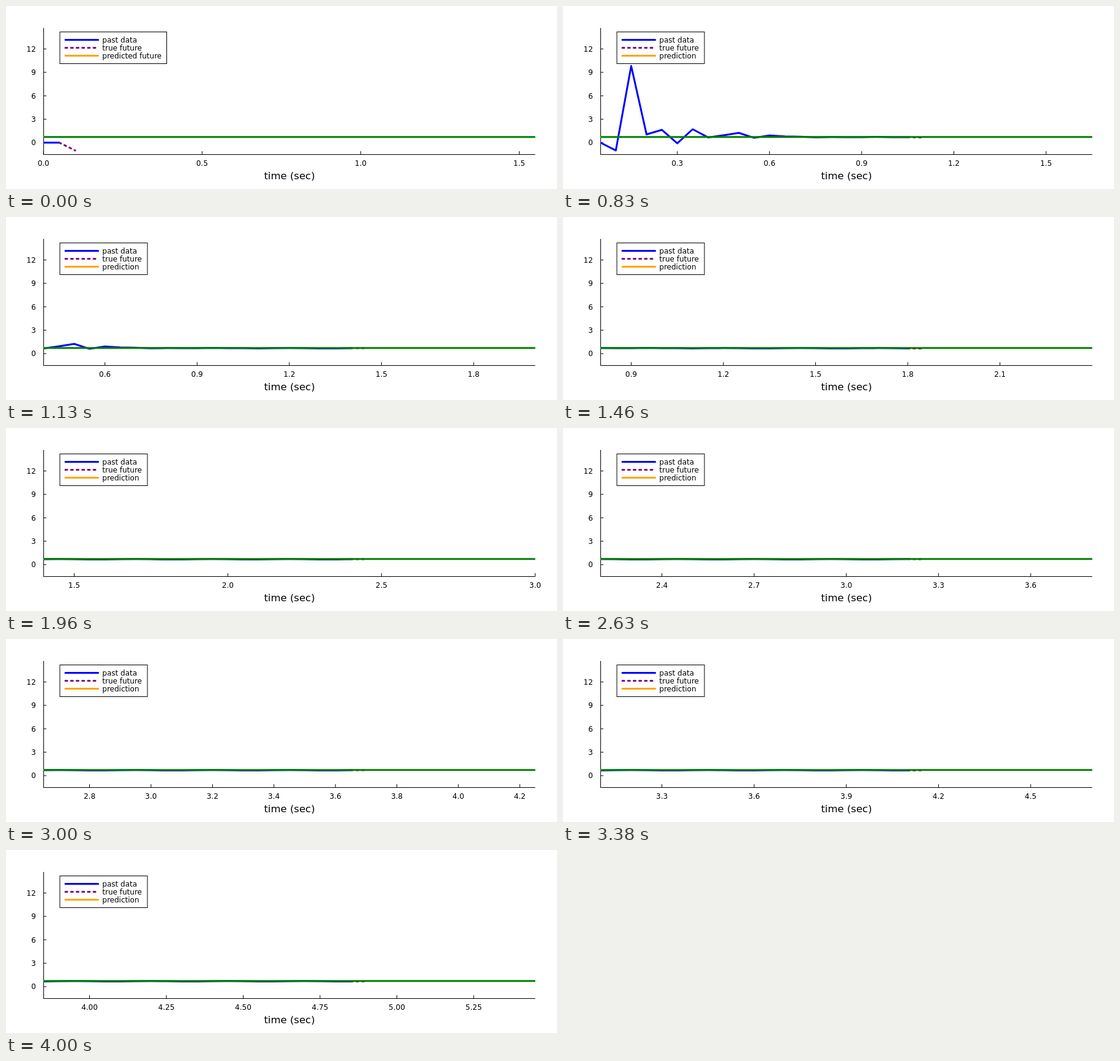
Write an HTML page that moves like this. It is 900 px wide and 300 px high and loops after 4040 ms.

```html
<!DOCTYPE html>
<html lang="en">
<head>
<meta charset="utf-8">
<title>Prediction plot</title>
<style>
  html, body { margin: 0; width: 100%; height: 100%; overflow: hidden; background: #fff; }
  svg { display: block; font: 12px "DejaVu Sans", sans-serif; }
  .axis { stroke: #000; fill: none; }
  .line { fill: none; stroke-width: 3; stroke-linecap: round; stroke-linejoin: round; }
  .dash { stroke-dasharray: 3 6.2; }
</style>
</head>
<body>
<svg width="900" height="300" viewBox="0 0 900 300">
  <clipPath id="area"><rect x="61" y="36" width="803.5" height="207.5"/></clipPath>
  <g id="plot"></g>
</svg>
<script>
const LOOP = 4040, DT = 0.05, SETPOINT = 0.72;
const LEFT = 61.2, RIGHT = 864.3, BOTTOM = 243.3;
const START = [0, 0, -1, 9.82, 1.05, 1.64, -0.08, 1.72, 0.67, 0.94, 1.25, 0.62,
  0.91, 0.8, 0.77, 0.69, 0.72, 0.71, 0.71, 0.75, 0.71, 0.71];
const STEPS = [[5, 0.9], [2, 0.7], [2.5, 0.5], [3, 0.2]];
const plot = document.getElementById("plot");

// settling transient, then a small ripple just below the setpoint
const value = j => j < START.length ? START[j]
  : 0.685 + 0.03 * Math.cos(2 * Math.PI * (j * DT - 3.95) / 0.25);
const yOf = v => 224 - 12.8 * v;

// tick step with the best mix of count, coverage and niceness
function ticks(min, max) {
  let best = { score: -1 };
  for (const [q, nice] of STEPS) {
    const step = q * 0.1, at = [];
    for (let r = 0; r * step <= max; r++) if (r * step >= min) at.push(r * step);
    const n = at.length;
    if (n < 4) continue;
    const score = Math.max(0, 1 - Math.abs(n - 5) / 5) / 4
      + 0.5 * (max - min) / ((n - 1) * step) + nice / 4 + (at[0] === 0) / 6;
    if (score > best.score) best = { score, at, digits: q === 2.5 ? 2 : 1 };
  }
  return best;
}

const text = (x, y, s, anchor = "start", size = 12) =>
  `<text x="${x}" y="${y}" text-anchor="${anchor}" font-size="${size}">${s}</text>`;
const line = (points, color, cls = "") =>
  `<polyline class="line ${cls}" stroke="${color}" points="${points}"/>`;

function axes(xOf, { at, digits }) {
  let marks = `M61.5 36V243.5M61 243.5H864.5`, labels = "";
  for (const t of at) {
    marks += `M${xOf(t)} ${BOTTOM}v-5.3`;
    labels += text(xOf(t), 261.5, t.toFixed(digits), "middle");
  }
  for (let v = 0; v <= 12; v += 3) {
    marks += `M61 ${yOf(v)}h5`;
    labels += text(48.8, yOf(v) + 4.4, v, "end");
  }
  return `<path class="axis" d="${marks}"/>` + labels + text(463, 284, "time (sec)", "middle", 16.5);
}

function legend(name, width) {
  const rows = [["past data", "blue"], ["true future", "purple", "dash"], [name, "orange"]];
  return `<rect x="88" y="42.5" width="${width}" height="52" fill="#fff" stroke="#000"/>` +
    rows.map(([label, color, cls], i) => {
      const y = 55.5 + 13 * i;
      return line(`97,${y} 150.5,${y}`, color, cls) + text(157.3, y + 4.5, label);
    }).join("");
}

function draw(k) {
  const warmup = k < 20, now = (k + 1) * DT;
  const min = warmup ? 0 : now - 1, max = warmup ? 1.55 : now + 0.6;
  const xOf = t => LEFT + (t - min) / (max - min) * (RIGHT - LEFT);
  const curve = (from, to) => {
    const points = [];
    for (let j = from; j <= to; j++) points.push(xOf(j * DT) + "," + yOf(value(j)));
    return points.join(" ");
  };
  const level = yOf(SETPOINT);
  plot.innerHTML = axes(xOf, ticks(min, max)) +
    `<g clip-path="url(#area)">` +
    line(curve(Math.max(0, k - 19), k + 1), "blue") +
    line(curve(k + 1, k + 2), "purple", "dash") +
    line(`${LEFT},${level} ${RIGHT},${level}`, "green") + `</g>` +
    (warmup ? legend("predicted future", 174.5) : legend("prediction", 143));
}

let shown = -1;
function tick() {
  // 24 steps per second, rounded to hundredths of a second
  const t = Math.floor(performance.now() % LOOP / 10) * 10;
  const k = Math.ceil((t + 5) * 3 / 125) - 1;
  if (k !== shown) draw(shown = k);
  requestAnimationFrame(tick);
}
tick();
</script>
</body>
</html>
```
